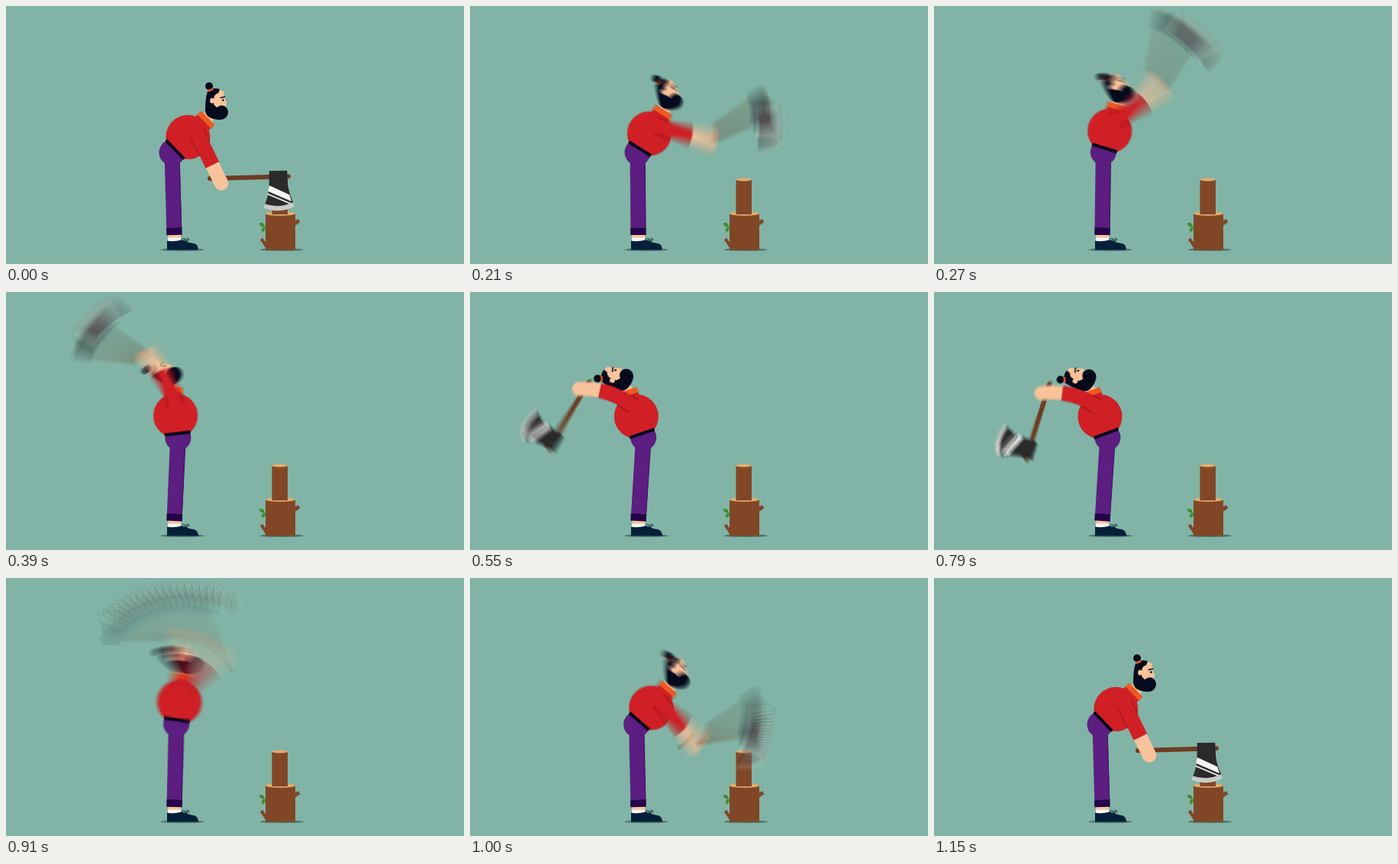
These frames come from a looping animation (600 px wide and 338 px high, 1.21 s). An HTML page with a canvas:

```html
<!DOCTYPE html>
<html lang="en">
<head>
<meta charset="utf-8">
<title>Woodcutter</title>
<style>
html, body { margin: 0; width: 100%; height: 100%; overflow: hidden; background: #81b4a6; }
canvas { display: block; width: 100vw; height: 100vh; }
</style>
</head>
<body>
<canvas id="stage" width="600" height="338"></canvas>
<script>
const LOOP = 1210, STEP = 40, BLUR = 20, SHUTTER = 0.9;
const RAD = Math.PI / 180;
const ink = {
  bg: '#81b4a6', shade: '#4c6f68', navy: '#050a1c', shoe: '#06203a', red: '#d02026', fold: '#8c151c',
  orange: '#ee5a24', skin: '#f8c39b', purple: '#5c1e80', cuff: '#27044a', seam: '#431466',
  bark: '#804626', wood: '#e3ad68', handle: '#6e3c22', steel: '#2a2a2b', edge: '#c9cbc8', leaf: '#3c8c30'
};

// S-curve around mid, exactly 0 at from and 1 at to
function ramp(x, from, to, mid, rate) {
  const s = v => 1 / (1 + Math.exp(rate * (mid - v)));
  const u = (s(x) - s(from)) / (s(to) - s(from));
  return Math.min(1, Math.max(0, u));
}
// 0 with the axe in the log, 1 fully wound back
const swing = (x, lag = 0) => ramp(x, 0.5, 19, 7.4 + lag, 0.5) * (1 - ramp(x, 17, 26, 23.25, 1.3));

function poseAt(x) {
  const p = swing(x);
  return {
    hip: [217.5 + 10 * p, 192 - 1.5 * p],
    waist: 46 - 67 * p,
    head: -73 * p,
    arm: 64 - 234 * p,
    bend: 15 * p * p,
    axe: -1 - 255 * swing(x, 1.6)
  };
}

const view = document.getElementById('stage').getContext('2d');
const sheet = document.createElement('canvas');
sheet.width = 600;
sheet.height = 338;
const g = sheet.getContext('2d');

function shape(d, fill) {
  g.fillStyle = fill;
  g.fill(new Path2D(d));
}
function line(d, color, width, cap = 'butt') {
  g.strokeStyle = color;
  g.lineWidth = width;
  g.lineCap = cap;
  g.stroke(new Path2D(d));
}
function oval(x, y, rx, ry, fill) {
  g.fillStyle = fill;
  g.beginPath();
  g.ellipse(x, y, rx, ry, 0, 0, 7);
  g.fill();
}
function box(x, y, w, h, fill) {
  g.fillStyle = fill;
  g.fillRect(x, y, w, h);
}
function at([x, y], deg, draw) {
  g.save();
  g.translate(x, y);
  g.rotate(deg * RAD);
  draw();
  g.restore();
}
const polar = (p, deg, r) => [p[0] + r * Math.cos(deg * RAD), p[1] + r * Math.sin(deg * RAD)];
const mix = (a, b, t) => [a[0] + (b[0] - a[0]) * t, a[1] + (b[1] - a[1]) * t];

function trunk(x, top, base, r, tilt) {
  box(x - r, top, 2 * r, base - top, ink.bark);
  oval(x, top, r, tilt, ink.wood);
}

function drawWood() {
  for (const x of [231, 361]) oval(x, 319.3, 29, 1.7, ink.shade);
  line('M377 286 L384 281', ink.bark, 5);
  line('M342 316 L334.500 305', ink.bark, 4);
  for (const turn of [-150, 115]) {
    at([339, 288.5], turn, () => shape('M0 0 Q4 -5 8.500 0 Q4 4 0 0Z', ink.leaf));
  }
  trunk(359.5, 272, 319.5, 19.5, 2.8);
  trunk(358.75, 227.5, 273, 10.25, 1.9);
}

function drawLeg(hip) {
  const foot = [220.5, 300], cuff = mix(foot, hip, 0.09);
  box(212.5, 298, 16.5, 6, ink.skin);
  box(212, 303.5, 17, 5, '#f4f4f2');
  shape('M211 319.500 V307.500 Q219 309.500 230 306.500 L236 308 Q241 311 246 311 Q252 312.500 252 319.500Z', ink.shoe);
  line('M230 307 Q233 302 235 307 Q238 302 240 306 L233 309', ink.shoe, 1);
  line(`M${cuff} L${hip}`, ink.purple, 20);
  line(`M${cuff[0] + 9.5} ${cuff[1]} L${hip[0] + 9.5} ${hip[1] + 10}`, ink.seam, 1);
  line(`M${foot} L${cuff}`, ink.cuff, 20.5);
}

function drawHead() {
  g.translate(-263, -150);
  shape('M268 113 Q278 107 286 113 L287.500 121 L290 129 L287.500 135 L268 138Z', ink.skin);
  oval(267, 106, 5, 5, ink.navy);
  shape('M265 113 Q272 107 281 110 L279 115 Q273 117 273 123 L273 130 L277 134 Q282 130 287 132 Q292 135 292 141 Q290 150 281 150 Q272 150 266 146 Q261 142 262 135 Q262 122 265 113Z', ink.navy);
  line('M265.500 112.500 L272 109.800', ink.orange, 2.6);
  oval(271, 125, 3, 3.5, ink.skin);
  oval(285.3, 124.5, 1.2, 1.4, ink.navy);
  line('M281.500 121.600 L288 119.800', ink.navy, 1.6);
}

// Origin is the fist, x runs along the handle, the blade faces +y
function drawAxe() {
  line('M-15 -6.500 L88 -7.500', ink.handle, 6, 'round');
  shape('M63 -15 H86.500 L87 3 Q89 18 95 29 Q76 40 55.500 31 Q62 18 62.500 3Z', ink.steel);
  shape('M62.700 4 L61 11.500 L91.500 25.500 L89 16.500Z', '#f3f3f1');
  line('M60 15 L92 29', '#e4e5e3', 1.8);
  shape('M56.500 28 Q75 35 94 26.500 L95.300 32 Q76 42 54.500 33Z', ink.edge);
}

function drawArm(s, f, p, chest) {
  const q = polar(mix(s, f, 0.5), p.arm + 90, p.bend);
  const t = 0.65, a = mix(s, q, t), b = mix(q, f, t), c = mix(a, b, t);
  const sleeve = `M${s} Q${a} ${c}`;
  g.save();
  g.beginPath();
  g.arc(...chest, 29, 0, 7);
  g.clip();
  line(sleeve, ink.fold, 21.4);
  g.restore();
  line(`M${c} Q${b} ${f}`, ink.skin, 18.5, 'round');
  line(sleeve, ink.red, 19.6);
  oval(...s, 10.3, 10.3, ink.red);
}

function drawScene(x) {
  const p = poseAt(x), up = p.waist - 90;
  const chest = polar(p.hip, up, 29);
  const collar = polar(chest, up, 33);
  const shoulder = polar(polar(chest, up, 13), p.waist, 1.5);
  const fist = polar(shoulder, p.arm, 76);

  box(0, 0, 600, 338, ink.bg);
  drawWood();
  drawLeg(p.hip);
  oval(...chest, 29, 29, ink.red);
  at(p.hip, p.waist, () => {
    g.fillStyle = ink.purple;
    g.beginPath();
    g.arc(0, 0, 17, -17 * RAD, 197 * RAD);
    g.fill();
    box(-17, -7.5, 34, 4, ink.navy);
  });
  at(collar, p.head, () => line('M0 0 L8 -9', ink.skin, 15));
  at(collar, p.waist, () => {
    box(-12.5, 3, 25, 8, ink.red);
    box(-13, -3.5, 26, 7, ink.orange);
  });
  at(collar, p.head, drawHead);
  at(fist, p.axe, drawAxe);
  drawArm(shoulder, fist, p, chest);
}

// Motion blur: running average of moments inside one shutter
function expose(step) {
  for (let k = 0; k < BLUR; k++) {
    drawScene(step + SHUTTER * ((k + 0.5) / BLUR - 0.5));
    view.globalAlpha = 1 / (k + 1);
    view.drawImage(sheet, 0, 0);
  }
}

let shown = -1;
const start = performance.now();
function tick() {
  const t = (performance.now() - start) % LOOP;
  const step = Math.min(29, Math.floor((t + 10) / STEP));
  if (step !== shown) {
    shown = step;
    expose(step);
  }
  requestAnimationFrame(tick);
}
tick();
</script>
</body>
</html>
```
